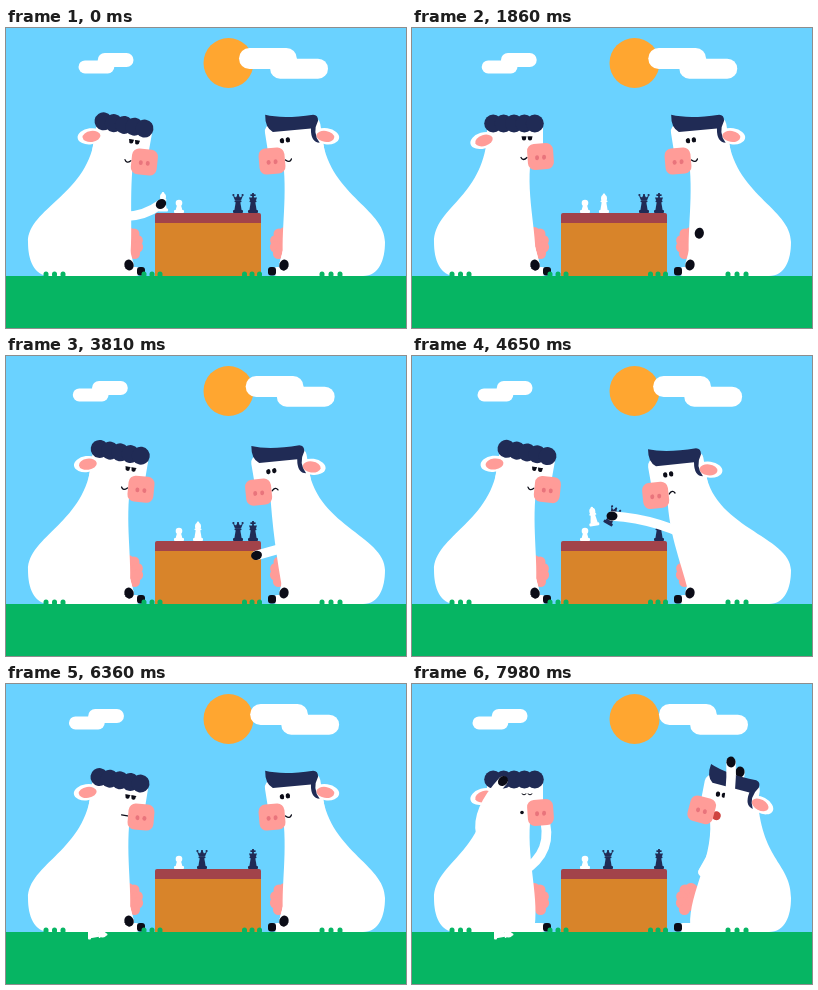
An HTML page with a canvas for the animation above (8 s loop, 400 by 300 pixels).

```html
<!DOCTYPE html>
<html lang="en">
<head>
<meta charset="utf-8">
<title>Cows playing chess</title>
<style>
html, body { margin: 0; width: 100%; height: 100%; overflow: hidden; background: #6ad2ff; }
canvas { display: block; width: 400px; height: 300px; }
</style>
</head>
<body>
<canvas id="stage"></canvas>
<script>
const LOOP = 8000, MIRROR = 401, BOARD = 175.5;
const SKY = '#6ad2ff', GRASS = '#06b563', WHITE = '#fff', NAVY = '#202b55', BLACK = '#0b0c17';
const PINK = '#ff9c98', ROSE = '#e9747c', RED = '#cf4440';
const STRIKE = 4560, GRAB = 4080, PLACE = 4850, LAND = 5400;
const canvas = document.getElementById('stage');
const g = canvas.getContext('2d');
const ratio = window.devicePixelRatio || 1;
canvas.width = 400 * ratio;
canvas.height = 300 * ratio;

const clamp = u => Math.min(1, Math.max(0, u));
const ease = u => u * u * (3 - 2 * u);

// Starts in one pose, then eases through moves of the form [start, duration, pose].
function glide(pose, moves, t) {
  return moves.reduce((now, [start, duration, goal]) => {
    const e = ease(clamp((t - start) / duration));
    return now.map((v, i) => v + (goal[i] - v) * e);
  }, pose);
}

function fillPath(color, trace) {
  g.fillStyle = color;
  g.beginPath();
  trace();
  g.fill();
}
const box = (color, x, y, w, h, r = 0) => fillPath(color, () => g.roundRect(x, y, w, h, r));
const oval = (color, x, y, rx, ry = rx, turn = 0) =>
  fillPath(color, () => g.ellipse(x, y, rx, ry, turn, 0, 7));
const poly = (color, points) => fillPath(color, () => points.forEach(p => g.lineTo(...p)));

function curve(color, width, x1, y1, cx, cy, x2, y2) {
  g.strokeStyle = color;
  g.lineWidth = width;
  g.lineCap = 'round';
  g.beginPath();
  g.moveTo(x1, y1);
  g.quadraticCurveTo(cx, cy, x2, y2);
  g.stroke();
}

function placed(x, y, degrees, draw) {
  g.save();
  g.translate(x, y);
  g.rotate(degrees * Math.PI / 180);
  draw();
  g.restore();
}

// Both cows are described facing right; the second is mirrored on drawing.
// Head poses are [x, tilt], hand poses [x, y, elbow bend].
const UPRIGHT = [102, 0], ATTENTIVE = [114, 9], REST = [123, 237, 0];

const leftCow = {
  head: t => glide([118, 10], [[0, 300, [125, 13]], [480, 420, [110, 7]], [900, 450, UPRIGHT],
    [3300, 600, [115, 10]], [4700, 300, ATTENTIVE], [6450, 400, UPRIGHT]], t),
  near: t => glide([155, 176, 0.2], [[0, 300, [190, 176, 0.2]], [450, 400, REST],
    [6500, 450, [133, 132, 0.75]], [7320, 380, [131, 130, 0.4]]], t),
  far: t => glide(REST, [[6500, 450, [85, 132, 0]], [7350, 350, [91, 97, -0.7]]], t),
  hair() {
    for (let i = -2; i <= 2; i++) oval(NAVY, i * 10.4, 0, 9);
  },
  eyeX: 13, eyelid: true,
  closed: t => t > 7500,
  mouth: t => t < 4900 ? 'smile' : t < 6800 ? 'flat' : 'round'
};

const rightCow = {
  head: t => glide(ATTENTIVE, [[3500, 550, [137, 10]], [5100, 550, ATTENTIVE],
    [6450, 450, [144, 18]], [7350, 400, [79, -11]]], t),
  near: t => glide(REST, [[3500, 550, [169, 174, 0]], [GRAB, 200, [169, 160, -0.1]],
    [4280, 370, [201, 160, -0.12]], [4650, 200, [205, BOARD, 0]], [5050, 550, REST],
    [7320, 430, [73, 88, -0.15]]], t),
  far: t => glide(REST, [[1700, 500, [85, 107, 0]], [3150, 350, REST],
    [7320, 430, [82, 78, -0.15]]], t),
  hair() {
    placed(0, 0, -10, () => fillPath(NAVY, () => {
      g.moveTo(28, -9);
      g.quadraticCurveTo(10, -5, -20, -10);
      g.quadraticCurveTo(-25, -10, -25, -4);
      g.quadraticCurveTo(-19, 8, -27, 18);
      g.quadraticCurveTo(-18, 18, -18, 4);
      g.lineTo(20, 8);
      g.quadraticCurveTo(28, 4, 28, -9);
    }));
  },
  eyeX: 10.5, eyelid: false,
  closed: t => t > 2250 && t < 3150,
  mouth: t => t > 3700 && t < 5300 ? 'frown' : t > 6750 ? 'open' : 'smile'
};

function drawArm([x, y, bend]) {
  const sx = 110, sy = 188;
  const cx = (sx + x) / 2 - (y - sy) * bend;
  const cy = (sy + y) / 2 + (x - sx) * bend;
  curve(WHITE, 9.5, sx, sy, cx, cy, x, y);
  oval(BLACK, x, y, 5.5, 4.6, Math.atan2(y - cy, x - cx));
}

function drawMouth(kind) {
  if (kind === 'round') return oval(BLACK, 8, 33, 1.8);
  if (kind === 'open') return oval(RED, 11, 36, 4.5);
  const bend = { smile: 4, flat: 0, frown: -4 }[kind];
  curve(BLACK, 1.3, 7, 34, 9, 34 + bend, 13, 34);
}

function drawEye(x, y, cow, t) {
  if (cow.closed(t)) return curve(BLACK, 1, x - 2, y, x, y + 2, x + 2, y);
  oval(BLACK, x, y, 2.2, 2.6);
  if (cow.eyelid) {
    box(WHITE, x - 3, y - 4, 6, 2.7);
    box(BLACK, x - 2.5, y - 1.6, 5, 1);
  }
}

function drawHead(cow, t) {
  box(WHITE, -27, -4, 56, 48, [8, 8, 10, 14]);
  oval(WHITE, -31, 17, 13, 8, -0.3);
  oval(PINK, -30, 17, 9, 5.5, -0.3);
  for (const side of [-3, 3]) drawEye(cow.eyeX + side, 14.5, cow, t);
  drawMouth(cow.mouth(t));
  placed(26.5, 33, -4, () => {
    box(PINK, -13, -13, 26, 26, 7);
    for (const x of [-3.5, 3.5]) oval(ROSE, x, 1, 2, 2.4);
  });
  cow.hair();
}

function drawUdder() {
  oval(PINK, 122, 213, 9, 14);
  for (let i = 0; i < 4; i++) oval(PINK, 128 + 4 * Math.sin(i), 206 + i * 6.5, 5.5);
}

function drawCow(cow, t) {
  const [hx, tilt] = cow.head(t);
  const hy = 95.5 + (hx - UPRIGHT[0]) ** 2 / 180;
  const a = tilt * Math.PI / 180;
  const onHead = (x, y) =>
    [hx + x * Math.cos(a) - y * Math.sin(a), hy + x * Math.sin(a) + y * Math.cos(a)];
  const nape = onHead(-27, 14), chin = onHead(16, 43);

  drawUdder();
  fillPath(WHITE, () => {
    g.moveTo(...nape);
    g.bezierCurveTo(nape[0] - 5, nape[1] + 60, 22, 180, 22, 214);
    g.bezierCurveTo(22, 232, 28, 248, 44, 248);
    g.lineTo(122, 248);
    g.bezierCurveTo(128, 215, chin[0] - 3, chin[1] + 40, ...chin);
  });
  box(WHITE, 95, 239, 38, 9, 3);
  box(BLACK, 131, 239, 8, 8.5, 3);

  const far = cow.far(t);
  const farRaised = far[1] < 230;
  drawArm(cow.near(t));
  if (!farRaised) drawArm(far);
  placed(hx, hy, tilt, () => drawHead(cow, t));
  if (farRaised) drawArm(far);
}

function foot(color) {
  box(color, -5, 6.5, 10, 3, 1);
  poly(color, [[-2, -3], [2, -3], [3.7, 7], [-3.7, 7]]);
}
const collar = color => box(color, -3.5, -3, 7, 1.8, 0.8);
const pieces = {
  pawn() {
    box(WHITE, -5, 6.5, 10, 3, 1);
    poly(WHITE, [[-1.8, 1], [1.8, 1], [3.5, 7], [-3.5, 7]]);
    oval(WHITE, 0, -0.5, 3.3);
  },
  bishop() {
    foot(WHITE);
    collar(WHITE);
    oval(WHITE, 0, -5, 3, 3.7);
    oval(WHITE, 0, -8.6, 1.3);
  },
  queen() {
    foot(NAVY);
    collar(NAVY);
    poly(NAVY, [[-3, -3], [-5, -8], [-2, -6], [0, -9.5], [2, -6], [5, -8], [3, -3]]);
    for (const x of [-4.6, 0, 4.6]) oval(NAVY, x, -8.5, 1.1);
  },
  king() {
    foot(NAVY);
    collar(NAVY);
    poly(NAVY, [[-2.5, -2], [-4, -6], [4, -6], [2.5, -2]]);
    box(NAVY, -0.9, -10.5, 1.8, 5);
    box(NAVY, -2.6, -9.2, 5.2, 1.7);
  }
};

function bishopPose(t) {
  if (t < 300) {
    const [x, y] = leftCow.near(t);
    return [x + 2, y - 2, 0];
  }
  const u = clamp((t - STRIKE) / (LAND - STRIKE));
  const bounce = t > LAND ? 3 * Math.sin(Math.PI * clamp((t - LAND) / 160)) : 0;
  return [192 - 100.5 * u, BOARD - 165 * u + 240 * u * u - bounce, -270 * ease(u)];
}

function queenPose(t) {
  if (t < GRAB) return [232, BOARD, 0];
  if (t > PLACE) return [196, BOARD, 0];
  const [x, y] = rightCow.near(t);
  return [MIRROR - x, y, 40 * Math.sin(Math.PI * (t - GRAB) / (PLACE - GRAB))];
}

// Two overlapping pills; direction tells on which side the lower one sticks out.
function drawCloud(left, top, width, height, direction) {
  const length = width * 0.65, drop = height * 0.46;
  const upperX = direction > 0 ? left : left + width - length;
  const lowerX = direction > 0 ? left + width - length : left;
  box(WHITE, upperX, top, length, height, height / 2);
  box(WHITE, lowerX, top + drop + 1, length, height - 1, height / 2);
  box(WHITE, left + width - length, top + drop + 1, 2 * length - width, height - drop - 1);
}

function drawTufts(x, gap) {
  for (let i = 0; i < 3; i++) box(GRASS, x + i * gap - 2.5, 243.5, 5, 6, 2.5);
}

function draw(t) {
  g.setTransform(ratio, 0, 0, ratio, 0, 0);
  box(SKY, 0, 0, 400, 300);
  oval('#ffa630', 222.5, 35, 25);
  const drift = t / LOOP;
  drawCloud(72.5 - 12 * drift, 25, 55, 14, -1);
  drawCloud(233 + 14 * drift, 20, 89, 21, 1);

  box(GRASS, 0, 248, 400, 52);
  box('#d8842a', 149, 190, 106, 58);
  box('#a2434a', 149, 185, 106, 10, [2, 2, 0, 0]);

  const struck = t > STRIKE;
  const drawBishop = () => placed(...bishopPose(t), pieces.bishop);
  placed(173, BOARD, 0, pieces.pawn);
  placed(247, BOARD, 0, pieces.king);
  placed(...queenPose(t), pieces.queen);
  if (!struck) drawBishop();

  drawCow(leftCow, t);
  g.save();
  g.translate(MIRROR, 0);
  g.scale(-1, 1);
  drawCow(rightCow, t);
  g.restore();

  if (struck) drawBishop();
  drawTufts(40, 8.5);
  drawTufts(138, 8);
  drawTufts(238.5, 7.5);
  drawTufts(316, 9);
}

function frame() {
  draw(performance.now() % LOOP);
  requestAnimationFrame(frame);
}
frame();
</script>
</body>
</html>
```
